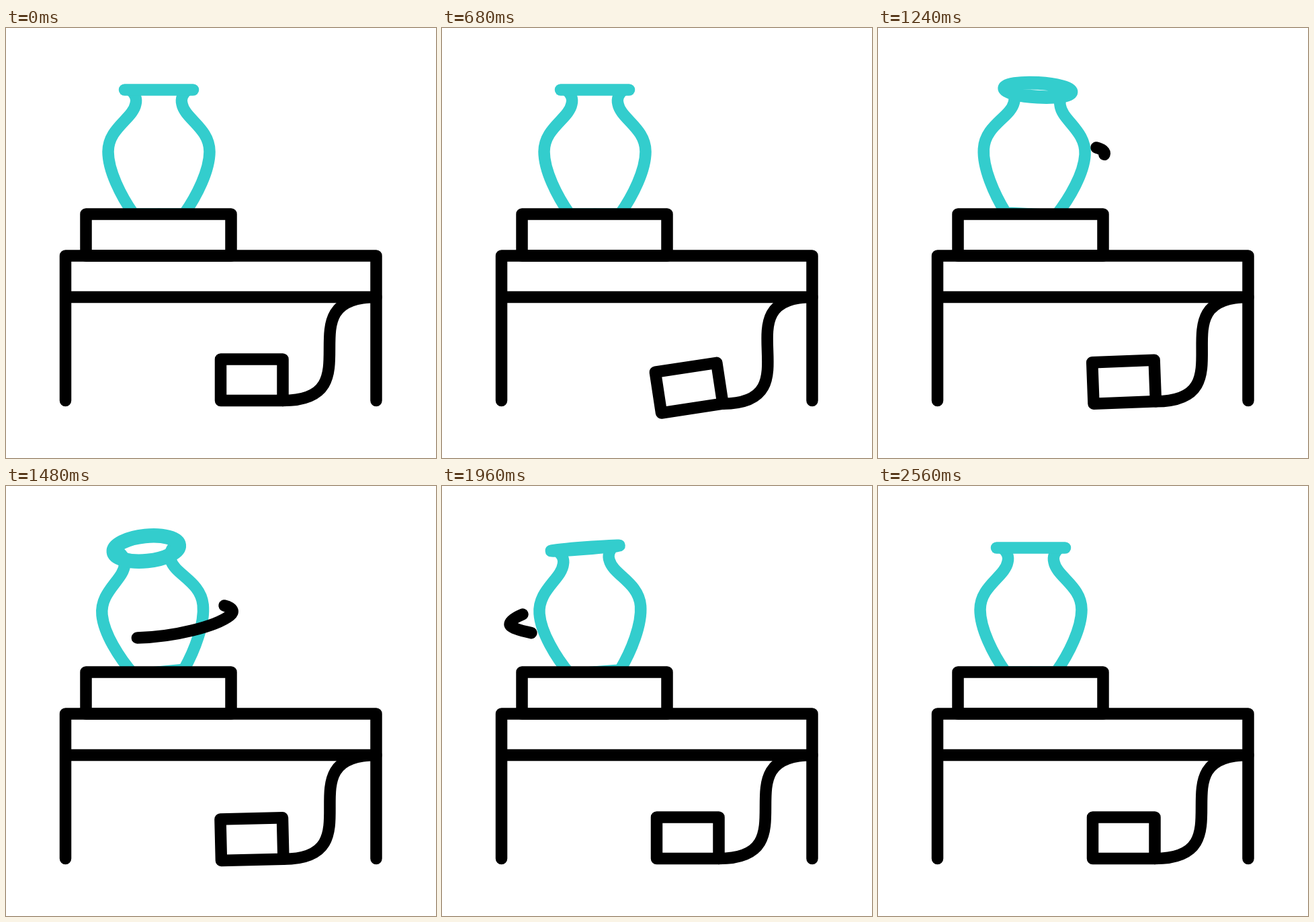
Recreate the animation shown at these times as an HTML page with a canvas. Size 640 by 640 pixels, loop 2.84 s.

```html
<!DOCTYPE html>
<html lang="en">
<head>
<meta charset="utf-8">
<title>Pottery wheel</title>
<style>
  html, body { margin: 0; width: 100%; height: 100%; overflow: hidden; background: #fff; }
  canvas { display: block; width: 640px; height: 640px; }
</style>
</head>
<body>
<canvas id="stage" width="640" height="640"></canvas>
<script>
const ctx = document.getElementById('stage').getContext('2d');
const LOOP = 2840, STEP = 40, LAST_POSE = 2560;
const INK = '#000', CLAY = '#33cdcd', WIDTH = 17.5;
const TRAIL_LENGTH = 297;

// Keyframes are [time in ms, value] pairs, eased in between.
const PEDAL_ANGLE = [[0, 0], [320, 15], [632, -9.6], [960, 7.4], [1300, -3], [1640, 0]];
const VASE_ANGLE = [[780, 0], [1140, 6], [1460, -6], [1720, 6], [2030, -6], [2260, 5.5], [2560, 0]];
const RIM_OPEN = [[960, 0], [1480, 1], [1490, 1], [2055, 0]];
const TRAIL_HEAD = [[1150, 0], [1760, 1]];
const TRAIL_TAIL = [[1490, 0], [2170, 1]];

const trail = new Path2D('M325 178 C337 181 341 187 333 193 C312 209 250 225 195 226' +
  ' C150 224 101 214 101 206 C101 201 108 196 120 191');
const vaseSide = new Path2D('M-41.5 -184 C-35.5 -179 -32.5 -171 -34.5 -164' +
  ' C-38.5 -142 -75.5 -128 -75.5 -93 C-75.5 -65 -56.5 -27 -37.5 0 H0');
const table = new Path2D('M88.5 554.5 V339 H551 V554.5 M88.5 400.5 H551');

const radians = degrees => degrees * Math.PI / 180;

function valueAt(keys, time) {
  if (time <= keys[0][0]) return keys[0][1];
  for (let i = 1; i < keys.length; i++) {
    const [t0, a] = keys[i - 1], [t1, b] = keys[i];
    if (time < t1) {
      const u = (time - t0) / (t1 - t0);
      return a + (b - a) * u * u * (3 - 2 * u);
    }
  }
  return keys[keys.length - 1][1];
}

function drawRim(open) {
  ctx.beginPath();
  if (open < 0.01) {
    ctx.moveTo(-51, -185);
    ctx.lineTo(51, -185);
  } else {
    ctx.lineWidth = WIDTH + 4 * open;
    ctx.ellipse(0, -185, 51 - 2.25 * open, 18.6 * open, 0, 0, Math.PI * 2);
  }
  ctx.stroke();
}

function drawVase(time) {
  ctx.save();
  ctx.strokeStyle = CLAY;
  ctx.translate(227.5, 277);
  ctx.rotate(radians(valueAt(VASE_ANGLE, time)));
  ctx.stroke(vaseSide);
  ctx.scale(-1, 1);
  ctx.stroke(vaseSide);
  ctx.scale(-1, 1);
  drawRim(valueAt(RIM_OPEN, time));
  ctx.restore();
}

function drawTable() {
  ctx.fillStyle = '#fff';
  ctx.fillRect(119, 277, 216, 62);
  ctx.strokeRect(119, 277, 216, 62);
  ctx.stroke(table);
}

function drawPedal(time) {
  const pivotX = 446, pivotY = 517, cornerX = -34, cornerY = 37.5;
  const angle = radians(valueAt(PEDAL_ANGLE, time));
  const cos = Math.cos(angle), sin = Math.sin(angle);

  ctx.save();
  ctx.translate(pivotX, pivotY);
  ctx.rotate(angle);
  ctx.strokeRect(cornerX - 92.5, cornerY - 61.5, 92.5, 61.5);
  ctx.restore();

  const x = pivotX + cornerX * cos - cornerY * sin;
  const y = pivotY + cornerX * sin + cornerY * cos;
  ctx.beginPath();
  ctx.moveTo(x, y);
  ctx.bezierCurveTo(x + 139, y, 412, 400.5, 551, 400.5);
  ctx.stroke();
}

function drawTrail(time) {
  const head = valueAt(TRAIL_HEAD, time), tail = valueAt(TRAIL_TAIL, time);
  if (head - tail < 0.005) return;
  ctx.save();
  ctx.setLineDash([(head - tail) * TRAIL_LENGTH, 1000]);
  ctx.lineDashOffset = -tail * TRAIL_LENGTH;
  ctx.stroke(trail);
  ctx.restore();
}

function draw(time) {
  ctx.fillStyle = '#fff';
  ctx.fillRect(0, 0, 640, 640);
  ctx.lineWidth = WIDTH;
  ctx.lineCap = ctx.lineJoin = 'round';
  ctx.strokeStyle = INK;
  drawVase(time);
  drawTable();
  drawPedal(time);
  drawTrail(time);
}

const start = performance.now();
function tick() {
  const elapsed = (performance.now() - start) % LOOP;
  draw(Math.min(LAST_POSE, Math.floor(elapsed / STEP) * STEP));
  requestAnimationFrame(tick);
}
tick();
</script>
</body>
</html>
```
